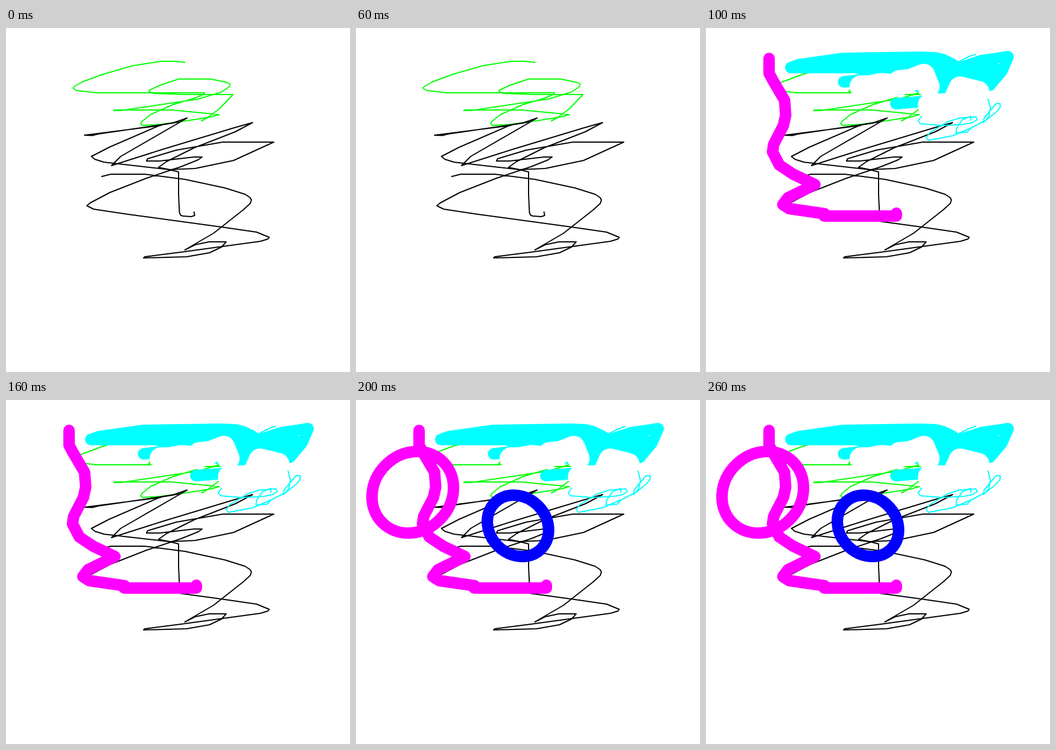
Animation of 600 by 600 pixels, one loop 300 ms. Source, as an HTML page:

```html
<!DOCTYPE html>
<html lang="en">
<head>
<meta charset="utf-8">
<title>Scribbles</title>
<style>
html, body { margin: 0; height: 100%; overflow: hidden; background: #fff; }
svg { display: block; width: 100vw; height: 100vh; fill: none; stroke-width: 2; stroke-linecap: round; stroke-linejoin: round; }
.thick { stroke-width: 20; }
.erase { stroke: #fff; stroke-width: 39; }
</style>
</head>
<body>
<svg viewBox="0 0 600 600">
  <g stroke="#0f0">
    <path d="M312 60 294 58H271L220 66 168 81 133 94 119 102 117 105 123 109 158 113H346V115L330 122 290 134 252 151 237 163 235 167 238 170 270 168 320 161 358 155 372 151 289 143H189L188 144H200L335 124 375 112 389 103 391 98 386 95 357 89H301L268 100 251 108 249 111 257 114 310 116H396L372 141 352 156 341 162"/>
  </g>
  <g stroke="#000">
    <path d="M301 164 270 169 180 208 149 224 155 229 171 234 285 247 301 251V291L302.500 322 305 327 309 328 323 329 329 327 328 321"/>
    <path d="M270 169 137 187 151 187.500 160 185 290 166 316 157 200 224 187 237 184 240 245 217 300 200 398 171 430 165" visibility="hidden"/>
    <path d="M270 170 137 187 151 187.500 160 185 290 166 316 157 200 224 187 237 184 240 272 212 398 174 430 165 400 181 328 209 280 233 266 243 285 247 330 245 397 231 467 199H378L297 213 247 228 245 232H268L328 225H342L335 230 305 242 245 262 181 287 147 305 141 310 153 316 213 325 375 347 437 356 459 365 457 368 444 372 378 381 305 391 242 399 240 401 315 399 355 392 376 382 384 373H354L330 378 312 387 362 358 414 317 426 306 428 300 426 296 417 290 382 279 312 264 242 255H183L167 259"/>
  </g>

  <g id="paint">
    <g stroke="#0ff">
      <path class="thick" fill="#0ff" d="M148 69 162 64 240 53 374 51 400 52 413 55 428 62 440 70 480 57 527 50 516 75 495 100 430 105 385 108 330 85 260 69Z"/>
      <path class="thick" d="M240 94 290 88 330 80 430 76M331 132 380 128 430 100"/>
      <path d="M470 46 458 50 435 62"/>
      <path stroke="#fff" d="M511 62h.1"/>
    </g>
    <path class="erase" d="M270 102 285 102 306 98 334 101 337 93 357 91 380 82 388 102M389 134 430 133 443 104 475 112 474 130 420 134"/>
    <path stroke="#0f0" d="M360 117 370 114.500"/>
    <g stroke="#0ff">
      <path d="M376 154 370 162 374 167 412 170 450 168 465 165 473 160 471 155 442 157 420 164 390 183 384 191 388 196 430 188 463 174 490 160 508 145 513 138V132H506L495 145 485 157 484 165 493 155 496 140 492 124"/>
      <path d="M462 161V154L447 160 437 175 436 183 455 182 463 174"/>
    </g>
    <path class="thick" stroke="#f0f" d="M110 53V79L117 92 137 126 139 152 135 170 118 203 116 216 128 239 152 255 190 273 143 296 134 308 145 315 207 324M206 328H332V323"/>
  </g>

  <g id="rings" class="thick">
    <ellipse rx="75" ry="67" stroke="#f0f" transform="translate(99 161) rotate(-45)"/>
    <ellipse rx="57" ry="49.600" stroke="#00f" transform="translate(282.500 219.500) rotate(45)"/>
  </g>
</svg>
<script>
const paint = document.getElementById('paint');
const rings = document.getElementById('rings');
const show = (el, on) => el.setAttribute('visibility', on ? 'visible' : 'hidden');

function draw() {
  const step = Math.floor(performance.now() % 300 / 100);
  show(paint, step > 0);
  show(rings, step > 1);
  requestAnimationFrame(draw);
}
draw();
</script>
</body>
</html>
```
